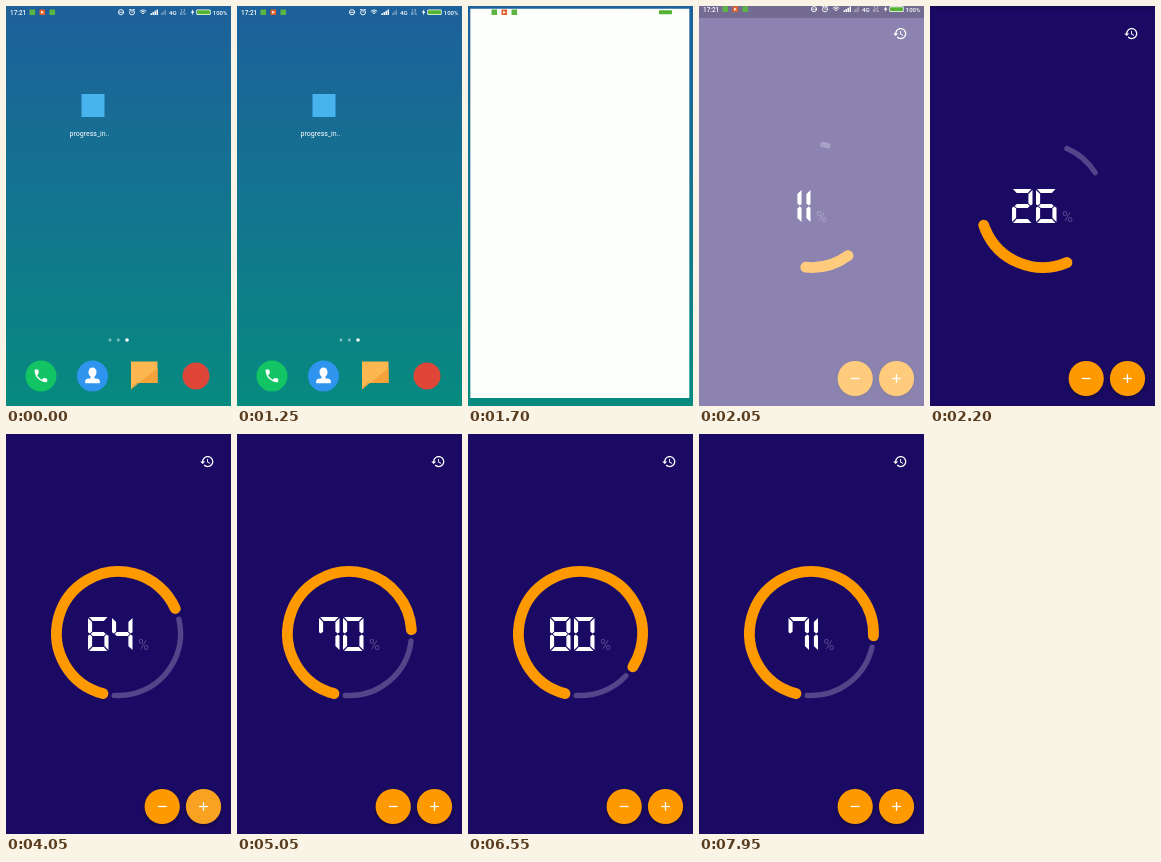
Write an HTML page with a canvas that moves like this. It is 225 px wide and 400 px high and loops after 8000 ms.

```html
<!DOCTYPE html>
<html lang="en">
<head>
<meta charset="utf-8">
<title>Progress ring</title>
<style>
  html, body { margin: 0; width: 100%; height: 100%; overflow: hidden; background: #1b0a64; }
  canvas { display: block; width: 225px; height: 400px; }
</style>
</head>
<body>
<canvas id="stage"></canvas>
<script>
const W = 225, H = 400, LOOP = 8000;
const canvas = document.getElementById('stage');
const ratio = window.devicePixelRatio || 1;
canvas.width = W * ratio;
canvas.height = H * ratio;
const ctx = canvas.getContext('2d');

const INDIGO = '#1b0a64', ORANGE = '#ff9900', WHITE = '#fff';
const FONT = 'Roboto, sans-serif';
const OPEN = 1450, INTRO = 1950, MOVE = 1000;
const RING = { x: 112.5, y: 199.5, r: 62 };
const START = 104.5, GAP = 10.5;
const MINUS = { x: 156.2, y: 372.5 }, PLUS = { x: 197.5, y: 372.5 };
const TAPS = [
  { down: 3450, up: 3800, step: 10, button: PLUS },
  { down: 5250, up: 5550, step: 10, button: PLUS },
  { down: 7000, up: 7350, step: -10, button: MINUS }
];

const clamp = v => Math.max(0, Math.min(1, v));
const span = (t, from, length) => clamp((t - from) / length);
const decelerate = x => 1 - (1 - x) * (1 - x);

function disc(x, y, r, color) {
  ctx.fillStyle = color;
  ctx.beginPath();
  ctx.arc(x, y, r, 0, Math.PI * 2);
  ctx.fill();
}

function box(x, y, w, h, color, r = 0) {
  ctx.fillStyle = color;
  ctx.beginPath();
  ctx.roundRect(x, y, w, h, r);
  ctx.fill();
}

function poly(points, color) {
  ctx.fillStyle = color;
  ctx.beginPath();
  points.forEach(([x, y]) => ctx.lineTo(x, y));
  ctx.closePath();
  ctx.fill();
}

function arc(x, y, r, from, to, width, color, cap = 'round') {
  ctx.strokeStyle = color;
  ctx.lineWidth = width;
  ctx.lineCap = cap;
  ctx.beginPath();
  ctx.arc(x, y, r, from * Math.PI / 180, to * Math.PI / 180);
  ctx.stroke();
}

function label(text, x, y, size, color = WHITE, weight = 400) {
  ctx.font = `${weight} ${size}px ${FONT}`;
  ctx.fillStyle = color;
  ctx.fillText(text, x, y);
}

function icon(path, x, y, scale, color = WHITE) {
  ctx.save();
  ctx.translate(x, y);
  ctx.scale(scale, scale);
  ctx.fillStyle = color;
  ctx.fill(path);
  ctx.restore();
}

const HANDSET = new Path2D('M6.6 10.8c1.4 2.8 3.8 5.1 6.6 6.6l2.2-2.2c.3-.3.7-.4 1-.2 1.1.4 2.3.6 3.6.6.6 0 1 .4 1 1V20c0 .6-.4 1-1 1C10.600 21 3 13.400 3 4c0-.6.4-1 1-1h3.500c.6 0 1 .4 1 1 0 1.300.2 2.500.6 3.600.1.300 0 .7-.2 1z');
const HISTORY = new Path2D('M13 3c-4.970 0-9 4.030-9 9H1l3.890 3.890.07.14L9 12H6c0-3.870 3.130-7 7-7s7 3.130 7 7-3.130 7-7 7c-1.930 0-3.680-.79-4.940-2.060l-1.420 1.420C8.270 19.990 10.510 21 13 21c4.970 0 9-4.030 9-9s-4.030-9-9-9zm-1 5v5l4.280 2.540.72-1.210-3.500-2.080V8z');

function drawHome() {
  const sky = ctx.createLinearGradient(0, 0, 0, H);
  sky.addColorStop(0, '#1d609b');
  sky.addColorStop(0.5, '#13758f');
  sky.addColorStop(1, '#068a7f');
  ctx.fillStyle = sky;
  ctx.fillRect(0, 0, W, H);

  box(75.5, 88, 23, 23, '#48b4ee');
  label('progress_in..', 63.5, 130, 7);

  disc(104, 334, 1.4, 'rgba(255,255,255,.5)');
  disc(112.3, 334, 1.4, 'rgba(255,255,255,.5)');
  disc(121, 334, 1.8, WHITE);

  disc(35, 370, 15.5, '#12c463');
  icon(HANDSET, 26.5, 361.5, 0.7);

  disc(86.5, 370, 15.5, '#2f94ee');
  ctx.fillStyle = WHITE;
  ctx.beginPath();
  ctx.ellipse(86.5, 366.3, 4, 4.9, 0, 0, Math.PI * 2);
  ctx.fill();
  box(84.500, 369, 4, 5, WHITE);
  box(79, 372.5, 15, 4.8, WHITE, [4, 4, 1, 1]);

  poly([[125, 355.500], [151.500, 355.500], [151.500, 377], [131, 377], [125, 383.500]], '#fdb750');
  poly([[125, 383.500], [151.500, 362], [151.500, 377], [131, 377]], '#f8a23c');

  disc(190, 370, 13.5, '#df4638');
}

function drawStatus() {
  label('17:21', 4, 8.6, 6.4, WHITE, 500);
  box(23.5, 3.4, 5.6, 5.6, '#5cb542', 0.6);
  box(33.5, 3.4, 5.6, 5.6, '#e2602c', 0.6);
  poly([[35.2, 4.7], [37.8, 6.2], [35.2, 7.7]], WHITE);
  box(43.500, 3.4, 5.6, 5.6, '#5cb542', 0.6);

  arc(115, 6.2, 2.6, 0, 360, 0.9, WHITE);
  box(112.6, 5.8, 4.8, 0.8, WHITE);
  arc(126, 6.4, 2.5, 0, 360, 0.9, WHITE);
  box(125.7, 4.8, 0.8, 2, WHITE);
  box(123, 3, 2, 0.8, WHITE);
  box(127, 3, 2, 0.8, WHITE);
  [1.4, 3, 4.6].forEach(r => arc(137, 8.6, r, 225, 315, 0.9, WHITE, 'butt'));
  for (let i = 0; i < 4; i++) {
    const h = 1.8 + i * 1.2;
    box(144.5 + i * 2, 9 - h, 1.5, h, WHITE);
    box(155 + i * 1.3, 9 - h, 0.9, h, 'rgba(255,255,255,.4)');
  }
  label('4G', 163, 8.6, 6.2, WHITE, 500);
  label('1.2', 174.3, 5.900, 3.6);
  label('K/s', 174.3, 9.3, 3.6);
  poly([[187.2, 3], [184.8, 6.7], [186.4, 6.7], [185.9, 9.4], [188.4, 5.6], [186.8, 5.6]], WHITE);
  box(190.3, 3.4, 14.4, 5.6, WHITE, 1.3);
  box(191, 4.2, 13, 4, '#54b330', 0.8);
  label('100%', 206.8, 8.6, 6, WHITE, 500);
}

// Seven-segment digits, segments named a to g clockwise from the top.
const SEGMENTS = {
  a: [[1, 0], [19.5, 0], [15.8, 4], [4.7, 4]],
  b: [[20.5, 0.9], [20.5, 15.2], [18.6, 16.6], [16.4, 14.6], [16.4, 5]],
  c: [[20.5, 33.1], [20.5, 18.8], [18.6, 17.4], [16.4, 19.4], [16.4, 29]],
  d: [[1, 34], [19.5, 34], [15.8, 30], [4.7, 30]],
  e: [[0, 33.1], [0, 18.8], [1.9, 17.4], [4.1, 19.4], [4.1, 29]],
  f: [[0, 0.9], [0, 15.2], [1.9, 16.6], [4.1, 14.6], [4.1, 5]],
  g: [[2.7, 17], [4.8, 15.1], [15.7, 15.1], [17.8, 17], [15.7, 18.9], [4.8, 18.9]]
};
const DIGITS = ['abcdef', 'bc', 'abged', 'abgcd', 'fgbc', 'afgcd', 'afgedc', 'fabc', 'abcdefg', 'abcdfg'];

function drawNumber(value) {
  const digits = [...String(Math.floor(value + 1e-6))];
  const width = d => d === '1' ? 5.5 : 20.5;
  const total = digits.reduce((sum, d) => sum + width(d) + 3.5, -3.5);
  let x = RING.x - (total + 16.5) / 2;
  for (const d of digits) {
    const shift = x - (20.5 - width(d));
    for (const s of DIGITS[d]) {
      poly(SEGMENTS[s].map(([px, py]) => [shift + px, 183 + py]), WHITE);
    }
    x += width(d) + 3.5;
  }
  label('%', x + 2, 216.3, 15, 'rgba(255,255,255,.26)');
}

function valueAt(t) {
  let value = 60 * decelerate(span(t, INTRO, MOVE));
  for (const tap of TAPS) value += tap.step * decelerate(span(t, tap.up, MOVE));
  return value;
}

function drawRing(t, value) {
  const rest = Math.pow(1 - span(t, INTRO, MOVE), 1.6);
  const start = START - 60 * rest;
  // During the intro the track grows toward its own resting place.
  const settled = t < INTRO + MOVE ? 60 : value;
  const trackFrom = START + settled * 3.6 + GAP - 60 * rest;
  const trackTo = START + 360 - GAP - 200 * rest;
  if (trackTo > trackFrom) {
    arc(RING.x, RING.y, RING.r, trackFrom, trackTo, 5.4, 'rgba(255,255,255,.24)');
  }
  if (value > 0) arc(RING.x, RING.y, RING.r, start, start + value * 3.6, 10.8, ORANGE);
}

function drawButton(button, t) {
  ctx.save();
  ctx.shadowColor = 'rgba(0,0,0,.4)';
  ctx.shadowBlur = 4 * ratio;
  ctx.shadowOffsetY = 1.5 * ratio;
  disc(button.x, button.y, 17.6, ORANGE);
  ctx.restore();

  for (const tap of TAPS) {
    if (tap.button !== button || t < tap.down) continue;
    const alpha = 0.3 * (1 - span(t, tap.up, 550));
    if (alpha <= 0) continue;
    ctx.save();
    ctx.beginPath();
    ctx.arc(button.x, button.y, 17.6, 0, Math.PI * 2);
    ctx.clip();
    const r = 4 + 24 * decelerate(span(t, tap.down, 500));
    disc(button.x - 5, button.y + 1, r, `rgba(215,205,200,${alpha})`);
    ctx.restore();
  }

  box(button.x - 4.4, button.y - 0.65, 8.8, 1.3, WHITE);
  if (button === PLUS) box(button.x - 0.65, button.y - 4.4, 1.3, 8.8, WHITE);
}

function drawApp(t) {
  ctx.fillStyle = INDIGO;
  ctx.fillRect(0, 0, W, H);
  icon(HISTORY, 193.6, 20, 0.625);
  const value = valueAt(t);
  drawRing(t, value);
  drawNumber(value);
  drawButton(MINUS, t);
  drawButton(PLUS, t);

  const veil = 1 - span(t, INTRO, 200);
  if (veil > 0) {
    ctx.fillStyle = `rgba(255,255,255,${veil})`;
    ctx.fillRect(0, 0, W, H);
  }
}

function draw(t) {
  ctx.setTransform(ratio, 0, 0, ratio, 0, 0);
  if (t < INTRO) {
    drawHome();
    const s = decelerate(span(t, OPEN, 300));
    box(87 * (1 - s), 100 * (1 - s), W * s, H * s, '#fdfffc');
  } else {
    drawApp(t);
  }
  const slide = span(t, 2000, 250);
  if (slide < 1) {
    ctx.save();
    ctx.translate(0, -15 * slide);
    if (t >= INTRO) box(0, 0, W, 15, 'rgba(0,0,0,.18)');
    drawStatus();
    ctx.restore();
  }
}

const begin = performance.now();
function tick() {
  draw((performance.now() - begin) % LOOP);
  requestAnimationFrame(tick);
}
tick();
</script>
</body>
</html>
```
